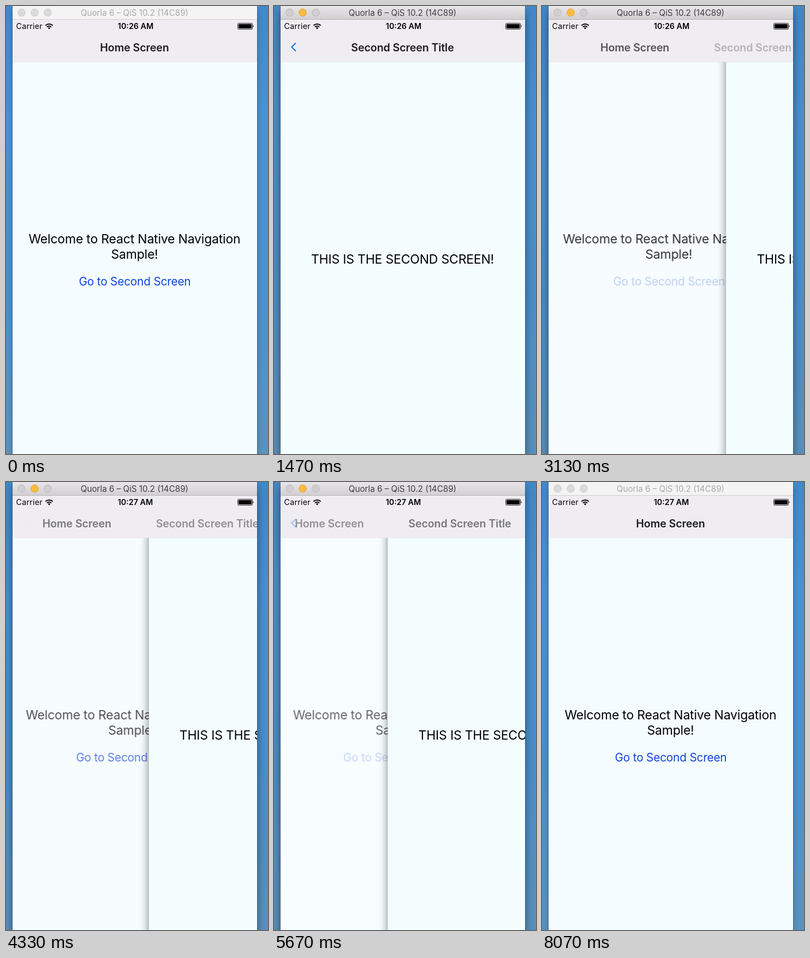
Recreate the animation shown at these times as an HTML page. Size 480 by 819 pixels, loop 8140 ms.

```html
<!DOCTYPE html>
<html lang="en">
<head>
<meta charset="utf-8">
<title>Navigation sample</title>
<style>
  /* Navigation progress: 0 = home, 1 = second screen */
  @property --p { syntax: "<number>"; inherits: true; initial-value: 0; }

  html, body { margin: 0; width: 100%; height: 100%; overflow: hidden; background: #478cc8; }
  svg {
    display: block; width: 480px; height: 819px;
    font-family: Inter, Roboto, sans-serif;
    animation: nav 8140ms cubic-bezier(.42, 0, .58, 1) infinite;
  }
  text { text-anchor: middle; }

  .bar { font-size: 15.2px; }
  .status { font-size: 14.3px; font-weight: 600; }
  .carrier { font-weight: 400; letter-spacing: .2px; text-anchor: start; }
  .title { font-size: 19.6px; font-weight: 600; letter-spacing: -.1px; fill: #1c1c1e; }
  .body { font-size: 23px; letter-spacing: -.2px; }
  .link { font-size: 20.8px; letter-spacing: -.2px; fill: #1143dc; animation: press 8140ms linear infinite; }

  .home { transform: translateX(calc(var(--p) * -12px)); opacity: calc(1 - var(--p) * .7); }
  .second { transform: translateX(calc((1 - var(--p)) * 448px)); opacity: calc(var(--p) * 1000); }
  .home-title { transform: translateX(calc(var(--p) * -239px)); opacity: calc(1 - var(--p)); }
  .second-title { transform: translateX(calc((1 - var(--p)) * 239px)); opacity: var(--p); }
  .back { opacity: calc((var(--p) - .44) * 3); }

  .active { animation: focus 8140ms step-end infinite; }
  .early { animation: early 8140ms step-end infinite; }
  .late { animation: late 8140ms step-end infinite; }
  .soft { filter: blur(6px); }
  .deep { filter: blur(12px); }

  @keyframes nav {
    0%, 10.69% { --p: 0; }
    16.83%, 21.25% { --p: 1; }
    27.4%, 36.24% { --p: 0; }
    42.38%, 49.93% { --p: 1; }
    56.07%, 66.38% { --p: 0; }
    72.52%, 79.91% { --p: 1; }
    86.06%, 100% { --p: 0; }
  }
  @keyframes press {
    0%, 9.46%, 16.83%, 35.01%, 42.38%, 65.15%, 72.52%, 100% { opacity: 1; }
    10.69%, 13.76%, 36.24%, 39.31%, 66.38%, 69.45% { opacity: .3; }
  }
  @keyframes focus { 0% { opacity: 0; } 6.14% { opacity: 1; } 93.37%, 100% { opacity: 0; } }
  @keyframes early { 0% { opacity: 1; } 40.54%, 100% { opacity: 0; } }
  @keyframes late { 0% { opacity: 0; } 40.54%, 100% { opacity: 1; } }
</style>
</head>
<body>
<svg viewBox="0 0 480 819">
  <defs>
    <linearGradient id="desk" x2="0" y2="1">
      <stop stop-color="#4289cb"/>
      <stop offset=".25" stop-color="#4a92d4"/>
      <stop offset=".65" stop-color="#4b91cd"/>
      <stop offset="1" stop-color="#5b93bf"/>
    </linearGradient>
    <linearGradient id="chrome" x2="0" y2="1">
      <stop stop-color="#e8e6e8"/>
      <stop offset="1" stop-color="#d2d0d2"/>
    </linearGradient>
    <linearGradient id="edge">
      <stop stop-opacity="0"/>
      <stop offset=".35" stop-opacity=".03"/>
      <stop offset=".7" stop-opacity=".12"/>
      <stop offset="1" stop-opacity=".26"/>
    </linearGradient>
    <clipPath id="frame"><path d="M12 0h448v819H12z"/></clipPath>
  </defs>

  <path fill="url(#desk)" d="M0 0h480v819H0z"/>
  <rect class="soft" x="12" y="8" width="448" height="840" opacity=".22"/>
  <g class="active"><rect class="deep" x="12" y="12" width="448" height="840" opacity=".25"/></g>
  <path d="M11.5 0v819M460.5 0v819" stroke="#1d4468" stroke-opacity=".4"/>

  <g clip-path="url(#frame)">
    <path fill="#fff" d="M12 24h448v795H12z"/>

    <g class="home">
      <path fill="#f4fcff" d="M12 102h470v717H12z"/>
      <text class="body" x="235.5" y="434">Welcome to React Native Navigation</text>
      <text class="body" x="235.5" y="462">Sample!</text>
      <text class="link" x="236" y="510.5">Go to Second Screen</text>
    </g>

    <g class="second">
      <path fill="url(#edge)" d="M-6 102h18v717H-6z"/>
      <path fill="#f4fdff" d="M12 102h448v717H12z"/>
      <text class="body" x="235.5" y="470.5">THIS IS THE SECOND SCREEN!</text>
    </g>

    <path fill="#efedf2" d="M12 24h448v78H12z"/>
    <path d="M12 102h448" stroke="#e3e4e9" stroke-width=".8"/>
    <path class="back" d="M40 67.5l-7.5 7.5 7.5 7.5" fill="none" stroke="#1e78e6" stroke-width="2.2"/>
    <text class="title home-title" x="235.5" y="83">Home Screen</text>
    <text class="title second-title" x="235.5" y="83">Second Screen Title</text>

    <g class="status">
      <text class="carrier" x="18.6" y="42.3">Carrier</text>
      <text class="early" x="237.5" y="42.3">10:26 AM</text>
      <text class="late" x="237" y="42.3">10:27 AM</text>
    </g>
    <g fill="none" stroke="#000" stroke-width="2">
      <path d="M72.3 35.6a9.6 9.6 0 0 1 13.4 0M74.9 38.4a5.8 5.8 0 0 1 8.2 0"/>
    </g>
    <path d="M79 42.4l-2.3-2.4a3.3 3.3 0 0 1 4.6 0z"/>
    <rect x="424.5" y="31.5" width="27" height="11" rx="2" fill="none" stroke="#000" stroke-width=".9"/>
    <rect x="425.9" y="32.9" width="24.2" height="8.2" rx=".8"/>
    <path d="M452.6 35c1.3.4 1.3 3.6 0 4z"/>

    <g>
      <path fill="#f5f4f5" d="M12 0h448v24H12z"/>
      <g fill="#dbdadb" stroke="#cbcacb">
        <circle cx="28.5" cy="12" r="6.8"/>
        <circle cx="52.5" cy="12" r="6.8"/>
        <circle cx="76.5" cy="12" r="6.8"/>
      </g>
      <text class="bar" x="235.5" y="18" fill="#acabac">Quorla 6 – QiS 10.2 (14C89)</text>
      <path d="M12 24.5h448" stroke="#d0ced0"/>
    </g>
    <g class="active">
      <path fill="url(#chrome)" d="M12 0h448v24H12z"/>
      <g fill="#d0ced0" stroke="#b9b7b9">
        <circle cx="28.5" cy="12" r="6.8"/>
        <circle cx="52.5" cy="12" r="6.8" fill="#fcbb40" stroke="#dfa034"/>
        <circle cx="76.5" cy="12" r="6.8"/>
      </g>
      <text class="bar" x="235.5" y="18" fill="#403f40">Quorla 6 – QiS 10.2 (14C89)</text>
      <path d="M12 24.5h448" stroke="#b3b1b3"/>
    </g>
  </g>
</svg>
</body>
</html>
```
